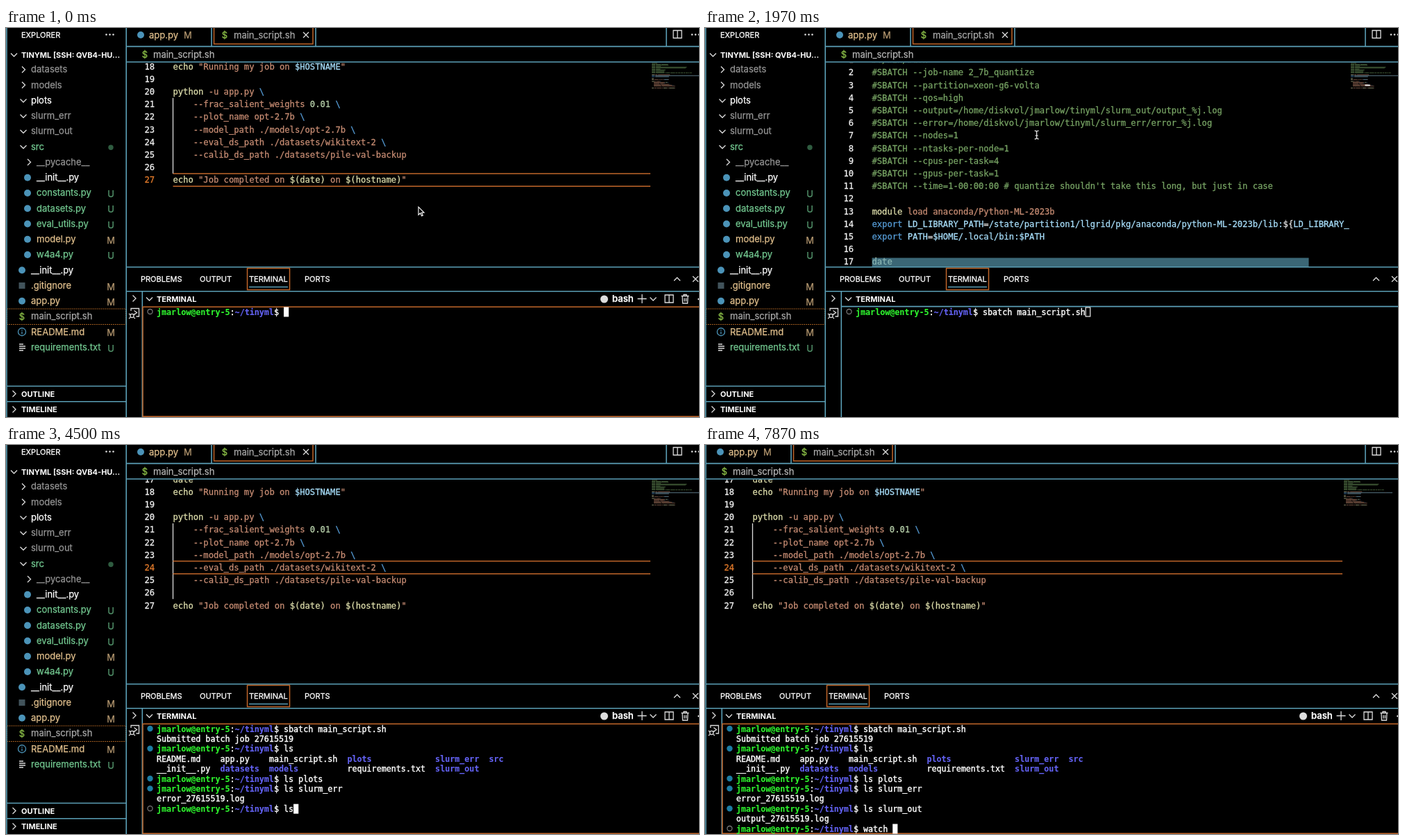
Animation, 998 px wide and 561 px high, one loop 8 s. Source, as an HTML page:

```html
<!DOCTYPE html>
<html lang="en">
<head>
<meta charset="utf-8">
<title>Submitting a batch job</title>
<style>
  html, body { margin: 0; width: 100%; height: 100%; overflow: hidden; background: #000; }
  svg { display: block; }
  #stage { width: 100vw; height: 100vh; color: #fff; }
  text, tspan { fill: currentColor; stroke: currentColor; white-space: pre; }
  text { font-family: Inter, Roboto, sans-serif; font-size: 13px; stroke-width: .25px; }
  .caps { font-size: 11px; stroke-width: .3px; }
  .head { font-size: 11px; font-weight: 700; stroke-width: 0; }
  .code { font-family: "DejaVu Sans Mono", monospace; font-size: 12.15px; stroke-width: .3px; }
  .term { font-family: "DejaVu Sans Mono", monospace; font-size: 11.69px; stroke-width: .4px; }
  .bold { font-weight: 700; stroke-width: .1px; }
  .end { text-anchor: end; }
  .mid { text-anchor: middle; }
  .icon { fill: none; stroke: #ddd; stroke-width: 1.3px; }
  .border { fill: none; stroke: #5b9fb6; stroke-width: 1.6px; }
  .focus { fill: none; stroke: #c0662a; stroke-width: 1.5px; }
  .match { fill: none; stroke: #c9a27c; stroke-width: 1px; }
</style>
</head>
<body>
<svg id="stage" viewBox="0 0 998 561">
  <g id="sidebar"></g>
  <g id="main"></g>
  <svg id="editor" y="50" height="294"></svg>
  <g id="minimap"></g>
  <g id="fixed"></g>
  <g id="mouse"></g>
</svg>
<script>
const LOOP = 8000;
const SIDEBAR_WIDTH = 172, SIDEBAR_CLOSES = 6600;
const CHAR = 7.315, LINE = 18.2, CODE_X = 65.5;
const TERM_CHAR = 7.037, TERM_LINE = 14.4;
const SELECT_START = 600, SELECT_END = 900, DESELECT = 1150, TERM_FOCUS = 2640;
const GREEN = '#73c991', YELLOW = '#e2c08d', GRAY = '#959595', ORANGE = '#e0792a';

const $ = id => document.getElementById(id);
const text = (x, y, str, cls = '', color = '#fff') =>
  `<text x="${x}" y="${y}" class="${cls}" color="${color}">${str}</text>`;
const path = (d, cls = 'icon', extra = '') => `<path d="${d}" class="${cls}" ${extra}/>`;
const rect = (x, y, w, h, extra) => `<rect x="${x}" y="${y}" width="${w}" height="${h}" ${extra}/>`;
const circle = (x, y, r, extra) => `<circle cx="${x}" cy="${y}" r="${r}" ${extra}/>`;
const down = (x, y) => path(`M${x - 4.5} ${y - 2}l4.5 4.5 4.5-4.5`);
const right = (x, y) => path(`M${x - 2} ${y - 4.5}l4.5 4.5-4.5 4.5`);
const cross = (x, y) => path(`M${x - 4} ${y - 4}l8 8m0-8l-8 8`);
const split = (x, y) => path(`M${x - 6} ${y - 5.5}h12v11h-12zM${x} ${y - 5.5}v11`);
const dots = (x, y) => [0, 5, 10].map(d => circle(x + d, y, 1.3, 'fill="#ddd"')).join('');
const dollar = (x, y) => text(x, y + 4.7, '$', 'mid', '#8dc149');
const show = (el, on) => { el.style.display = on ? '' : 'none'; };

// Linear interpolation through [time, ...values] points.
function track(points, t) {
  const i = points.findIndex(p => p[0] > t);
  if (i < 0) return points[points.length - 1].slice(1);
  if (i === 0) return points[0].slice(1);
  const a = points[i - 1], b = points[i], k = (t - a[0]) / (b[0] - a[0]);
  return a.slice(1).map((v, n) => v + (b[n + 1] - v) * k);
}

/* Sidebar: kind, depth, label, colour, status */
const TREE = [
  ['right', 0, 'datasets', GRAY], ['right', 0, 'models', GRAY], ['down', 0, 'plots', '#fff'],
  ['down', 0, 'slurm_err', GRAY], ['down', 0, 'slurm_out', GRAY], ['down', 0, 'src', GREEN, 'dot'],
  ['right', 1, '__pycache__', GRAY], ['py', 1, '__init__.py', '#fff'],
  ['py', 1, 'constants.py', GREEN, 'U'], ['py', 1, 'datasets.py', GREEN, 'U'],
  ['py', 1, 'eval_utils.py', GREEN, 'U'], ['py', 1, 'model.py', YELLOW, 'M'],
  ['py', 1, 'w4a4.py', GREEN, 'U'], ['py', 0, '__init__.py', '#fff'],
  ['git', 0, '.gitignore', YELLOW, 'M'], ['py', 0, 'app.py', YELLOW, 'M'],
  ['sh', 0, 'main_script.sh', '#a8a8a8'], ['info', 0, 'README.md', YELLOW, 'M'],
  ['list', 0, 'requirements.txt', GREEN, 'U']
];
const pyIcon = (x, y) => circle(x, y, 5, 'fill="#4b93b8"');
const ICONS = {
  right, down, py: pyIcon, sh: dollar,
  git: (x, y) => rect(x - 4.5, y - 4.5, 9, 9, 'fill="#41535b"'),
  info: (x, y) => circle(x, y, 5.5, 'class="icon" style="stroke:#4b93b8"') +
    path(`M${x} ${y - 3.2}v1.5m0 1.3v3.6`, 'icon', 'style="stroke:#4b93b8"'),
  list: (x, y) => path(`M${x - 4} ${y - 4.5}h6m-6 3h9m-9 3h9m-9 3h6`)
};

function treeRow([kind, depth, label, color, status], i) {
  const y = 60 + i * 22.25;
  const folder = kind === 'right' || kind === 'down';
  const mark = status === 'dot' ? circle(151, y + 1, 3.7, 'fill="#2f5c40"')
    : status ? text(151, y + 6, status, 'mid', color === GREEN ? '#579b70' : '#b59870') : '';
  return ICONS[kind]((folder ? 25 : 23) + depth * 8, y) +
    text(36 + depth * 8, y + 4.4, label, '', color) + mark;
}

$('sidebar').innerHTML =
  text(22, 13.5, 'EXPLORER', 'caps') + dots(144.5, 9.5) +
  down(11.5, 38.5) + text(22, 42.5, 'TINYML [SSH: QVB4-HU...', 'head') +
  rect(1.5, 405, 171, 22.5, 'fill="none" stroke="#a05c20" stroke-dasharray="2 1"') +
  TREE.map(treeRow).join('') +
  path('M1 516.5H173M1 538.7H173', 'border') +
  right(11.5, 527.5) + text(22, 531.7, 'OUTLINE', 'head') +
  right(11.5, 550) + text(22, 554.2, 'TIMELINE', 'head') +
  path('M1 0V561', 'border');

/* Parts that move left when the sidebar closes */
const debugIcon = path('M180 408v-3.500h11.500v11.500h-4M184.500 407.500l4 3-4 3') +
  circle(181.5, 415, 2.6, 'class="icon"') + path('M177 412l2 1.500M177 419l2-1.500M186 412l-2 1.500M186 419l-2-1.500');
$('main').innerHTML =
  path('M173.200 0V561M173 26.600H1200M173 49H1200M173 344.800H1200M173 379.700H1200M196.300 380V561M296 0V27M446 0V27', 'border') +
  path('M196 401.600H1200', 'border', 'id="termLine"') +
  path('M299.500 0V23H442V0', 'focus') +
  pyIcon(194, 10) + text(206, 14.6, 'app.py', '', YELLOW) + text(256, 14.6, 'M', '', '#b59870') +
  dollar(315, 10) + text(328, 14.6, 'main_script.sh', '', '#a8a8a8') + cross(432, 10) +
  dollar(200, 38.5) + text(212, 43.2, 'main_script.sh', '', '#b4b4b4') +
  [[194, 'PROBLEMS'], [279, 'OUTPUT'], [350, 'TERMINAL'], [430, 'PORTS']]
    .map(([x, s]) => text(x, 366, s, 'caps')).join('') +
  rect(347.5, 346.5, 61, 31, 'class="focus"') + path('M350 373.500H406', 'border') +
  right(184.5, 390) + debugIcon + down(206.5, 390.5) + text(217, 394.8, 'TERMINAL', 'head') +
  path('M1200 402.300H197V560.300H1200', 'focus', 'id="termFocus"') + '<g id="terminal"></g>';

$('fixed').innerHTML =
  path('M951 0V27', 'border') + split(967, 9) + dots(988, 9.5) +
  path('M962 364.500l4.500-4.500 4.500 4.500') + cross(993, 362) +
  '<g id="termTools">' + circle(861.5, 391, 5.5, 'fill="#ddd"') +
  '<text x="873" y="395.300" font-weight="600">bash</text>' +
  path('M909.500 390.500h13m-6.500-6.500v13') + down(932, 390.5) + split(955, 390.5) +
  path('M972.500 386.500h11m-9.500 0l.5 10.500h7l.5-10.500m-6 0v-2h4v2m-3 3v5m2.500-5v5') +
  circle(997.5, 391, 1.3, 'fill="#ddd"') + '</g>';

/* Code: segments split by "|", first letter is the colour */
const INK = { y: '#dcdcaa', o: '#c58b72', v: '#a6dcf8', b: '#569cd6', n: '#b5cea8', g: '#76a263', w: '#e0e0e0' };
const CODE = [
  'g#!/bin/bash',
  'g#SBATCH --job-name 2_7b_quantize',
  'g#SBATCH --partition=xeon-g6-volta',
  'g#SBATCH --qos=high',
  'g#SBATCH --output=/home/diskvol/jmarlow/tinyml/slurm_out/output_%j.log',
  'g#SBATCH --error=/home/diskvol/jmarlow/tinyml/slurm_err/error_%j.log',
  'g#SBATCH --nodes=1',
  'g#SBATCH --ntasks-per-node=1',
  'g#SBATCH --cpus-per-task=4',
  'g#SBATCH --gpus-per-task=1',
  "g#SBATCH --time=1-00:00:00 # quantize shouldn't take this long, but just in case",
  '',
  'ymodule |oload anaconda/Python-ML-2023b',
  'bexport |vLD_LIBRARY_PATH|w=|v/state/partition1/llgrid/pkg/anaconda/python-ML-2023b/lib:|w${|vLD_LIBRARY_PATH|w}',
  'bexport |vPATH|w=|v$HOME/.local/bin:$PATH',
  '',
  'ydate',
  'yecho |o"Running my job on |v$HOSTNAME|o"',
  '',
  'ypython |o-u app.py |b\\',
  'o    --frac_salient_weights |n0.01 |b\\',
  'o    --plot_name opt-2.7b |b\\',
  'o    --model_path ./models/opt-2.7b |b\\',
  'o    --eval_ds_path ./datasets/wikitext-2 |b\\',
  'o    --calib_ds_path ./datasets/pile-val-backup',
  '',
  'yecho |o"Job completed on |y$(date)|o on |y$(hostname)|o"'
].map(line => line ? line.split('|').map(s => [INK[s[0]], s.slice(1)]) : []);
const plain = line => line.map(s => s[1]).join('');
const lineY = n => 5.3 + (n - 18) * LINE;
const spans = parts => parts.map(([c, s, cls = '']) => `<tspan color="${c}" class="${cls}">${s}</tspan>`).join('');

/* The selection runs from the third column of line 20 to the end of line 25 */
const SELECTED = [20, 21, 22, 23, 24, 25];
const selectionRow = n => {
  const str = plain(CODE[n - 1]), last = n === 25, from = n === 20 ? 2 : 0;
  const x = CODE_X + from * CHAR, top = lineY(n) - LINE / 2;
  const width = (str.length - from + !last) * CHAR;
  const inked = str.slice(from).replace(/ /g, '<tspan color="#999">·</tspan>');
  return `<g class="sel">${rect(x, top, width, LINE + .3, 'fill="#fff"')}` +
    text(x, lineY(n) + 4.3, inked, 'code', '#111') +
    (last ? rect(CODE_X + 40 * CHAR, top, 6 * CHAR, LINE, 'class="match"') : '') + '</g>';
};
$('editor').innerHTML = '<g id="scroller">' +
  path(`M${CODE_X} ${lineY(20.5)}V${lineY(26.5)}`, 'icon') +
  CODE.map((line, i) =>
    text(39, lineY(i + 1) + 4.3, i + 1, 'code end num') +
    text(CODE_X, lineY(i + 1) + 4.3, spans(line), 'code')).join('') +
  path(`M${CODE_X} ${-LINE / 2}H1200M${CODE_X} ${LINE / 2}H1200`, 'focus', 'id="current"') +
  SELECTED.map(selectionRow).join('') + '</g>' +
  rect(CODE_X, 281.5, 629, 13, 'id="hscroll" fill="#5b9fb6" opacity=".65"');

/* Minimap: one thin bar per word */
const MINI = .73, MINI_LINE = 1.37, MINI_WIDTH = 70;
const miniY = n => 50.5 + (n - 1) * MINI_LINE;
function miniLine(line, i) {
  let col = 0, out = '';
  for (const [color, str] of line) {
    for (const word of str.matchAll(/\S+/g)) {
      const x = (col + word.index) * MINI;
      if (x < MINI_WIDTH) out += rect(930 + x, miniY(i + 1), Math.min(word[0].length * MINI, MINI_WIDTH - x), 1,
        `fill="${color}" opacity=".55"`);
    }
    col += str.length;
  }
  return out;
}
const miniSelection = n => rect(930, miniY(n) - .3, n < 25 ? MINI_WIDTH : plain(CODE[n - 1]).length * MINI,
  1.7, 'class="sel" fill="#fff"');
$('minimap').innerHTML = CODE.map(miniLine).join('') + SELECTED.map(miniSelection).join('') +
  rect(930 + 28 * MINI, miniY(24) - .3, 10 * MINI, 1.7, 'id="miniWord" fill="#fff"');

/* Terminal session: typing steps [from, to, text], time of Enter, output */
const DIR = '#6463f5', W = '#fff';
const dir = s => [DIR, s, 'bold'];
const SESSION = [
  { keys: [[100, 430, 'sbatch main_script.sh']], enter: 2720, out: [[[W, 'Submitted batch job 27615519']]] },
  { keys: [[2900, 2950, 's'], [3050, 3060, ''], [3130, 3230, 'ls']], enter: 3330, out: [
    [[W, 'README.md    app.py    main_script.sh  '], dir('plots'.padEnd(18)), dir('slurm_err  src')],
    [[W, '__init__.py  '], dir('datasets  models'.padEnd(26)), [W, 'requirements.txt  '], dir('slurm_out')]] },
  { keys: [[3450, 3720, 'ls plots']], enter: 3800, out: [] },
  { keys: [[3880, 4240, 'ls slurm_err']], enter: 4310, out: [[[W, 'error_27615519.log']]] },
  { keys: [[4400, 4480, 'ls'], [4520, 4670, 'ls slurm_'], [4830, 5080, 'ls slurm_out']], enter: 5280,
    out: [[[W, 'output_27615519.log']]] },
  { keys: [[7430, 7860, 'watch ']], enter: Infinity, out: [] }
];
const PROMPT = [['#2ff52f', 'jmarlow@entry-5', 'bold'], [W, ':'], dir('~/tinyml'), [W, '$ ']];
const PROMPT_LEN = 26;

function typed(keys, t) {
  let now = '';
  for (const [from, to, str] of keys) {
    if (t < from) break;
    const keep = str.startsWith(now) ? now.length : 0;
    now = str.slice(0, keep + Math.ceil((str.length - keep) * Math.min(1, (t - from) / (to - from))));
  }
  return now;
}

function terminal(t, focused) {
  let y = 409.5, out = '';
  const print = parts => { out += text(217, y + 4.1, spans(parts), 'term'); y += TERM_LINE; };
  for (const { keys, enter, out: lines } of SESSION) {
    const done = t >= enter, cmd = typed(keys, t);
    out += circle(207.5, y - .5, done ? 4.2 : 3.5, done ? 'fill="#1c7da3"' : 'fill="none" stroke="#777" stroke-width="1.3"');
    if (!done) {
      const x = 217 + (PROMPT_LEN + cmd.length) * TERM_CHAR;
      out += focused ? rect(x, y - 7, 7.2, 14, 'fill="#fff"') : rect(x + .5, y - 6.5, 6.5, 13, 'class="icon"');
    }
    print([...PROMPT, [W, cmd]]);
    if (!done) break;
    lines.forEach(print);
  }
  return out;
}

/* Pointer and scrolling */
const POINTER = [[0, 594, 258], [380, 594, 258], [600, 577, 183], [900, 253, 92], [1020, 253, 92],
  [1150, 480, 165], [1300, 480, 143], [1900, 480, 143], [2200, 470, 190], [2480, 470, 190], [2640, 450, 470]];
const SCROLL = [[1200, 0], [1670, 282.2], [1800, 300], [2050, 300], [2450, 12.2]];
$('mouse').innerHTML =
  path('M0 0v11.500l2.700-2.500 1.900 4 1.800-.8-1.900-3.900h3.600z', '', 'id="arrow" fill="#000" stroke="#fff" stroke-width="1.1"') +
  path('M-3-6q3 0 3 2q0-2 3-2M0-4V4M-3 6q3 0 3-2q0 2 3 2M-2 1h4', 'icon', 'id="beam"');

const numbers = [...document.querySelectorAll('.num')];
const selected = [...document.querySelectorAll('.sel')];
let lastTerminal = '';

function draw(t) {
  const open = t < SIDEBAR_CLOSES, shift = open ? 0 : -SIDEBAR_WIDTH;
  show($('sidebar'), open);
  $('main').setAttribute('transform', `translate(${shift})`);
  $('editor').setAttribute('x', 175 + shift);
  $('editor').setAttribute('width', open ? 753 : 915);
  $('minimap').setAttribute('transform', `translate(${open ? 0 : -10})`);

  const scroll = track(SCROLL, t)[0];
  $('scroller').setAttribute('transform', `translate(0 ${scroll})`);
  show($('hscroll'), t > 1350 && t < 2450);

  const selecting = t >= SELECT_START && t < DESELECT;
  const firstRow = Math.round(track([[SELECT_START, 25], [SELECT_END, 20]], t)[0]);
  selected.forEach((el, i) => show(el, selecting && SELECTED[i % SELECTED.length] >= firstRow));
  const active = t < SELECT_START ? 27 : selecting ? firstRow : 24;
  numbers.forEach((el, i) => el.setAttribute('color', i + 1 === active ? ORANGE : '#f0f0f0'));
  show($('current'), !selecting);
  $('current').setAttribute('transform', `translate(0 ${lineY(active)})`);

  const focused = t < SELECT_START || t >= TERM_FOCUS;
  show($('miniWord'), t >= DESELECT && !focused);
  show($('termFocus'), focused);
  show($('termLine'), !focused);
  show($('termTools'), focused);
  const markup = terminal(t, focused);
  if (markup !== lastTerminal) $('terminal').innerHTML = lastTerminal = markup;

  const [x, y] = track(POINTER, t);
  $('mouse').setAttribute('transform', `translate(${x} ${y})`);
  show($('mouse'), t < 2760);
  show($('arrow'), t < 380);
  show($('beam'), t >= 380);
}

const start = performance.now();
function frame() {
  draw((performance.now() - start) % LOOP);
  requestAnimationFrame(frame);
}
frame();
</script>
</body>
</html>
```
